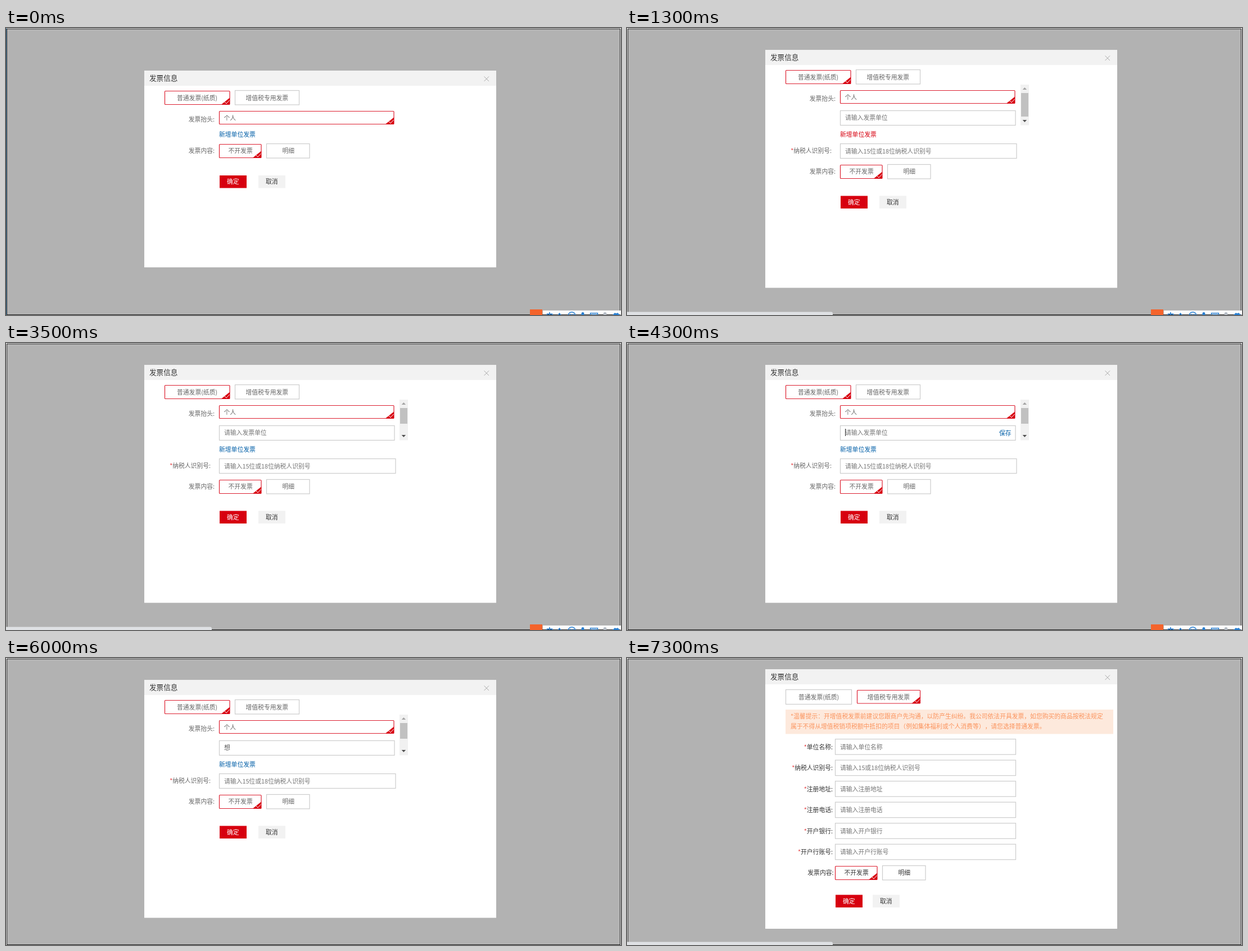
Recreate the animation shown at these times as an HTML page. Size 1094 by 512 pixels, loop 8000 ms.

```html
<!DOCTYPE html>
<html lang="zh-CN">
<head>
<meta charset="utf-8">
<title>发票信息</title>
<style>
html, body { margin: 0; width: 100%; height: 100%; overflow: hidden; background: #fff; }
svg { display: block; text-spacing-trim: space-all; font-family: "Noto Sans CJK SC", "Noto Sans CJK JP", sans-serif; }
.half { font-family: "Noto Sans Mono CJK SC", "Noto Sans CJK SC", monospace; }
</style>
</head>
<body>
<svg id="stage" width="1094" height="512" viewBox="0 0 1094 512"></svg>
<script>
const LOOP = 8000, SIZE = 10.8;
const RED = '#d7000f', BLUE = '#005ea7', GRAY = '#666', DARK = '#333', HINT = '#757575', ICON = '#2a7fd0';
const tracks = [];

// y is the vertical middle of the glyphs
const text = (x, y, s, fill = GRAY, size = SIZE, extra = '') =>
  `<text x="${x}" y="${y + size * .375}" fill="${fill}" font-size="${size}" ${extra}>${s}</text>`;
const rect = (x, y, w, h, fill, extra = '') =>
  `<rect x="${x}" y="${y}" width="${w}" height="${h}" fill="${fill}" ${extra}/>`;
const path = (d, fill, stroke = 'none', w = 1) =>
  `<path d="${d}" fill="${fill}" stroke="${stroke}" stroke-width="${w}"/>`;
const label = (right, y, s, fill, star = '') =>
  text(right, y, `<tspan fill="#e4393c">${star}</tspan>${s}:`, fill, SIZE, 'text-anchor="end"');

// keys: time, opacity, time, opacity, ...
const track = (keys, content) =>
  `<g data-track="${tracks.push(keys) - 1}">${content}</g>`;
const during = (from, to, content) => track([0, from ? 0 : 1, from, 1, to, 0], content);

function box(x, y, w, h, picked) {
  if (!picked) return rect(x, y, w, h, '#fff', 'stroke="#ccc" stroke-width="1.2"');
  const r = x + w, b = y + h;
  return rect(x, y, w, h, '#fff', 'stroke="#dc1f30" stroke-width="1.2" rx="1"') +
    path(`M${r} ${b - 12}V${b}H${r - 15}Z`, RED) +
    path(`M${r - 9} ${b - 4.5}l3 3l5.5 -6`, 'none', '#fff');
}

const field = (x, y, w, h, hint) => box(x, y, w, h) + text(x + 8.5, y + h / 2, hint, HINT);

const dialog = (y, h) =>
  rect(246, y, 626, h, '#fff') + rect(246, y, 626, 27, '#f2f2f2') +
  text(255, y + 13.7, '发票信息', DARK, 12.6) +
  path(`M850.5 ${y + 10.5}l8.5 8.5m0 -8.5l-8.5 8.5`, 'none', '#aaa');

const personal = y =>
  box(282.5, y + 36.5, 115.5, 24, true) + text(304, y + 48.5, '普通发票(纸质)') +
  box(407.5, y + 35.5, 114, 25.5) + text(426.5, y + 48.5, '增值税专用发票') +
  label(371, y + 86.5, '发票抬头', GRAY) +
  box(379.5, y + 72.5, 310.5, 23, true) + text(387.5, y + 84.5, '个人');

const details = (x, y, right, fill) =>
  label(right, y, '发票内容', fill) +
  box(x, y - 11.5, 74.5, 24, true) + text(x + 16, y, '不开发票', fill) +
  box(x + 84, y - 12.5, 76.5, 25.5) + text(x + 112, y, '明细', fill);

const buttons = (x, y, x2) =>
  rect(x, y, 48, 22.5, RED) + text(x + 13, y + 11.2, '确定', '#fff', SIZE, 'font-weight="500"') +
  rect(x2, y, 48, 22.5, '#f2f2f2') + text(x2 + 13, y + 11.2, '取消', DARK);

const link = fill => text(379, 190, '新增单位发票', fill);
const caret = x => rect(x, 153, 1, 13, '#222');

const candidates = [
  [398, '1.想', '#f22'], [438.5, '2.写'], [479, '3.下'], [519.5, '4.('],
  [544, 'ˇ_ˇ'], [572, ')'], [588, '想～'], [628, '5.先']
];
const popup =
  rect(388.5, 165.5, 335, 50, '#f5fafe', 'stroke="#a9c3d6"') +
  rect(389, 191, 334, 24, '#e9f3fb') + rect(397, 190, 299, 1, '#c9d9e6') +
  text(398, 178.5, 'x', '#1560b0', 13.5, 'font-weight="700"') + rect(406, 170, 1, 17, '#f33') +
  track([0, 0, 5000, .5, 5100, 1],
    text(443, 178, '①', '#f0e2d4', 10.5) +
    text(456, 178, '更多颜文字(分号+F)', '#2a74c4', 10.5, 'class="half"')) +
  candidates.map(([x, s, fill = '#1787dd']) => text(x, 202.5, s, fill, 14, 'class="half"')).join('') +
  rect(669.5, 196.5, 25, 13, '#f5faff', 'stroke="#b3cfe5"') + rect(682, 197, 1, 12, '#b3cfe5') +
  rect(702.5, 196.5, 12.5, 13, '#f5faff', 'stroke="#b3cfe5"') +
  path('M678 200v6l-3.5 -3z', '#a9c9e6') + path('M686.5 199.5v7l4 -3.5z', ICON) +
  path('M705 201.5h7.5l-3.7 4z', ICON) +
  rect(697, 166, 25, 25, '#f8a478');

const imeBar =
  rect(955, 504, 138, 7, '#fff') + rect(932, 502, 22, 22, '#f4642c') +
  text(960.5, 513, '中', ICON, 13, 'font-weight="700"') +
  path('M981 514l3.5 -5l3 4', 'none', ICON, 1.6) +
  `<circle cx="1006.5" cy="513" r="6.3" fill="none" stroke="${ICON}" stroke-width="1.6"/>` +
  rect(1003.5, 510, 1.6, 2, ICON) + rect(1008, 510, 1.6, 2, ICON) +
  rect(1023.5, 507, 5, 9, ICON, 'rx="2.5"') +
  rect(1039.5, 508.7, 13, 9, 'none', `stroke="${ICON}" stroke-width="1.5"`) +
  path('M1042 511.2h8', 'none', ICON, 1.2) +
  '<circle cx="1065.5" cy="510" r="3" fill="#b5bcc4"/>' +
  path('M1079 512l4 -4q2.5 2 5 0l4 4z', ICON);

const scrollbar =
  rect(700, 101, 15, 72.5, '#f1f1f1') +
  path('M703.7 110h7.4l-3.7 -4z', '#a3a3a3') + path('M703.7 164h7.4l-3.7 4z', '#505050') +
  rect(701, 116, 13, 28, '#c1c1c1') +
  during(1300, 3400, rect(701, 143, 13, 15, '#c1c1c1'));

const compact = dialog(76, 351) + personal(76) + details(379.5, 219, 371, GRAY) + buttons(380, 263, 449);

const expanded = dialog(39, 424.5) + personal(39) +
  box(379.5, 147.5, 311.5, 26) +
  during(1300, 5200, text(388, 160, '请输入发票单位', HINT)) +
  during(5200, 7300, text(388, 160, '想', '#555')) +
  during(4100, 5200, caret(388)) + during(5200, 5600, caret(400)) +
  during(4100, 5400, text(662, 160.5, '保存', BLUE)) +
  during(5400, 5600, text(662, 160.5, '保存', RED)) +
  scrollbar +
  label(364, 219, '纳税人识别号', GRAY, '*') +
  field(379.5, 206.5, 313.5, 26, '请输入15位或18位纳税人识别号') +
  details(379.5, 256, 371, GRAY) + buttons(380, 299.5, 449);

const rows = [['单位名称'], ['纳税人识别号', '15或18位纳税人识别号'], ['注册地址'], ['注册电话'], ['开户银行'], ['开户行账号']];
const special = dialog(20, 463) +
  box(282.5, 56.5, 117, 26) + text(305, 69.5, '普通发票(纸质)') +
  box(409.5, 57.5, 112, 23.5, true) + text(427.5, 69.5, '增值税专用发票') +
  rect(282, 92, 583, 43.5, '#fde9dc') +
  text(291, 104, '*温馨提示：开增值税发票前建议您跟商户先沟通，以防产生纠纷。我公司依法开具发票，如您购买的商品按税法规定', '#fb935c') +
  text(291, 122, '属于不得从增值税销项税额中抵扣的项目（例如集体福利或个人消费等），请您选择普通发票。', '#fb935c') +
  rows.map(([name, hint = name], i) =>
    label(366, 158.5 + 37.5 * i, name, DARK, '*') +
    field(370.5, 144.7 + 37.5 * i, 321, 27.5, '请输入' + hint)).join('') +
  details(370.5, 383, 367.5, DARK) + buttons(371, 422.5, 437);

const stage = document.getElementById('stage');
stage.innerHTML =
  rect(1, 1, 1092, 511, '#b2b2b2') + rect(1.5, 1.5, 1091, 510, 'none', 'stroke="#222"') +
  during(0, 1200, rect(0, 0, 1, 512, '#4f87ad')) +
  during(0, 1300, compact) +
  during(1300, 7300, expanded) +
  during(7300, LOOP, special) +
  track([0, 1, 800, 0, 1600, 1, 3000, 0, 3500, 1, 7300, 0], link(BLUE)) +
  track([0, 0, 800, 1, 1600, 0, 3000, 1, 3500, 0], link(RED)) +
  during(4600, 5200, popup) +
  track([0, 0, 1200, 1, 1900, .55, 2000, .2, 3300, 1, 3800, .5, 3900, 0, 7100, 1],
    path('M0 512V506.5H363q3 0 3 3V512Z', '#dfe1e4')) +
  track([0, 1, 5700, .75, 5800, .5, 5900, .25, 6000, 0], imeBar);

const groups = stage.querySelectorAll('[data-track]');

function opacityAt(keys, t) {
  let value = keys[1];
  for (let i = 0; i < keys.length; i += 2) if (t >= keys[i]) value = keys[i + 1];
  return value;
}

function draw() {
  const t = performance.now() % LOOP;
  for (const g of groups) {
    const opacity = opacityAt(tracks[g.dataset.track], t);
    g.style.display = opacity ? '' : 'none';
    g.style.opacity = opacity;
  }
  requestAnimationFrame(draw);
}
draw();
</script>
</body>
</html>
```
